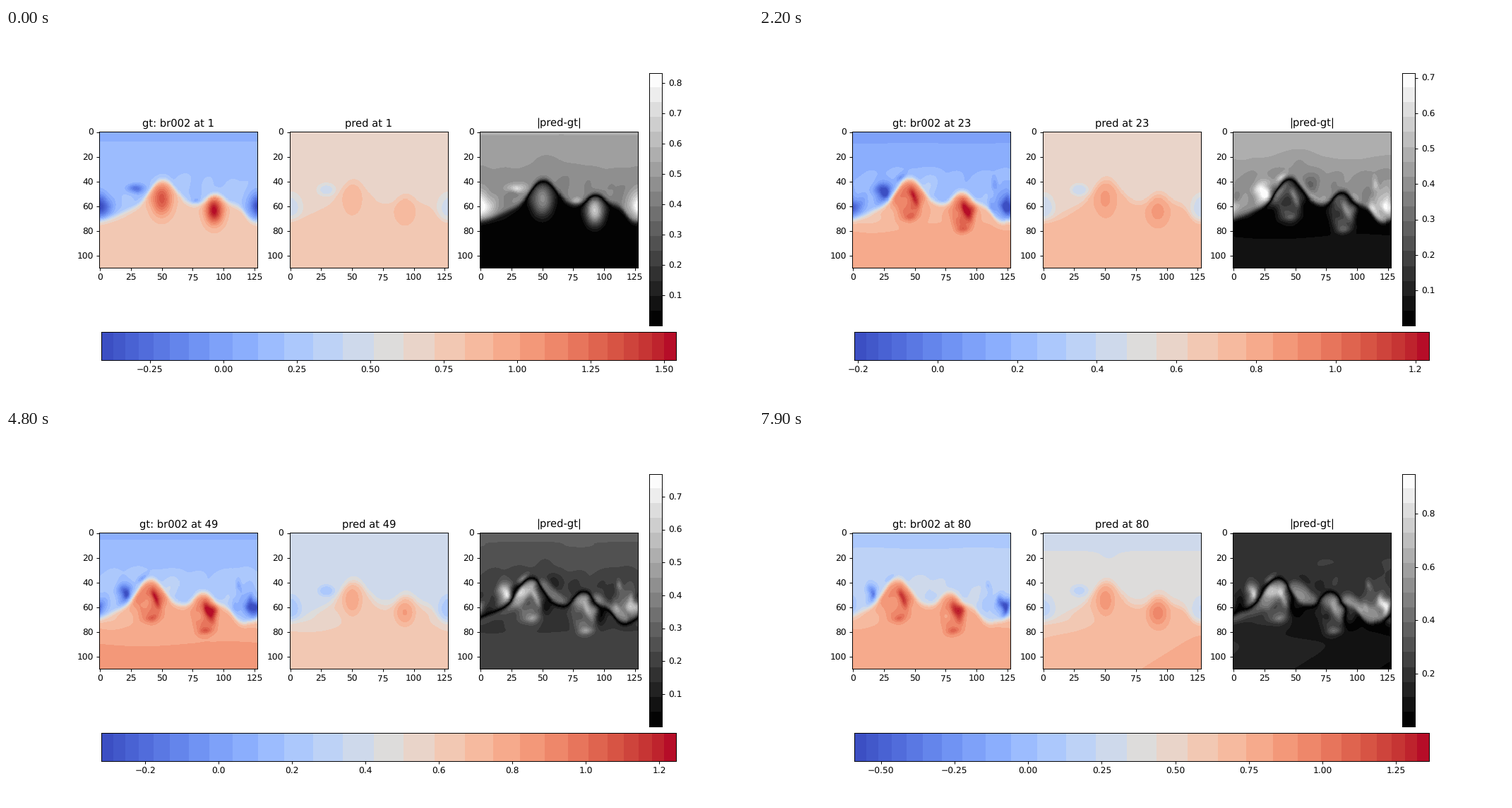
Animation of 1058 by 529 pixels, one loop 8 s. Source, as a matplotlib script:

```python
import numpy as np
import matplotlib.pyplot as plt
from matplotlib.animation import FuncAnimation
from matplotlib.colors import ListedColormap

W, H, FRAMES = 1058, 529, 80
plt.rcParams["font.family"] = "DejaVu Sans"
plt.rcParams["text.hinting"] = "none"

NX, NY = 224, 193
X, Y = np.meshgrid((np.arange(NX) + .5) / NX * 128 - .5,
                   (np.arange(NY) + .5) / NY * 110 - .5)

rng = np.random.default_rng(4)
WAVES = [[(rng.integers(2, 9), rng.uniform(-.4, .4), rng.uniform(0, 6.28))
          for _ in range(6)] for _ in range(3)]
STREAKS = [(rng.uniform(98, 128), rng.uniform(36, 64), rng.uniform(-.6, .6),
            rng.uniform(-.2, .03)) for _ in range(8)]


def sig(v):
    return 1 / (1 + np.exp(-np.clip(v, -40, 40)))


def wrap(d):
    return (d + 64) % 128 - 64


def blob(x, y, cx, cy, sx, sy, rot=0, power=1):
    d, e = wrap(x - cx), y - cy
    c, s = np.cos(rot), np.sin(rot)
    u, v = (d * c + e * s) / sx, (e * c - d * s) / sy
    return np.exp(-(u * u + v * v) ** power)


def ripple(n, x, y):
    return sum(np.sin(x * m * np.pi / 64 + y * q + ph)
               for m, q, ph in WAVES[n]) / 2.5


def clock(k):
    """Loop share, early decay and leftward drift at step k."""
    p = k / (FRAMES - 1)
    return p, np.exp(-k / 11), 15 * p ** .85


def limits(k):
    p, e, _ = clock(k)
    lo = -.16 - .43 * p * p - .255 * e ** 1.4
    hi = 1.17 + .193 * p * p + .371 * e
    top = np.interp(k, [0, 9, 14, 22, 42, 55, 67, 79],
                    [.834, .702, .685, .714, .731, .815, .853, .95])
    return lo, hi, top


def height(x, grow):
    """Warm/cold interface: a plateau with two humps."""
    x = x % 128
    plateau = 15 * (sig((x - 17) / 8) + sig((x - 145) / 8)) * sig((117 - x) / 2.8)
    plateau += 1.6 * sig((x - 128) / 2)
    hump1 = (19.5 + 1.5 * grow) * np.exp(-np.abs(wrap(x - 51) / 13.7) ** 2.3)
    hump2 = (7.5 + 2.5 * grow) * np.exp(-np.abs(wrap(x - 93) / 9.3) ** 2.3)
    return 73.5 - plateau - hump1 - hump2


def lobe(x, y, cx, cy, size, amp, grow, core):
    """Hot body that flattens while a tilted core and a tail form in it."""
    body = blob(x, y, cx, cy, size * (9 + 3.5 * grow), size * (13.5 + 3 * grow),
                0, 1.1 + .9 * grow)
    inner = (blob(x, y, cx + 4.5, cy - 3, 3.2, 8.5, -.35)
             + .6 * blob(x, y, cx + 1, cy + 13, 6, 3, -.15)
             - .4 * blob(x, y, cx - 5, cy + 1, 4, 5))
    return amp * body + core * grow * inner


def truth(k):
    p, e, s = clock(k)
    g = 1 - e
    env = np.exp(-((Y - 54) / 17) ** 2)
    a = (.35 + 1.15 * g) * env
    x = X + a * ripple(0, X + s, Y)
    y = Y + .8 * a * ripple(1, X + s, Y)
    warm = sig((Y - height(X + s, g)) / 1.35)

    cold = .07 + .06 * sig((Y - 5) / 3)
    cold = cold + .085 * sig((Y - 29 - 2 * np.sin(X / 14 + s / 4)) / 5)
    cold += (.03 + .025 * g) * env * ripple(2, X + s, Y)
    depth = limits(k)[0] - .22
    edge = 1 - .5 * s
    cold += depth * ((1 - .65 * p) * blob(x, y, edge, 60, 8.5, 10)
                     + .65 * p * blob(x, y, edge, 60, 3, 9))
    cold -= (.45 + .1 * p) * blob(x, y, 29 - .95 * s, 46 + 3 * g,
                                  7 - 3 * p, 4 + 4 * g)
    cold -= .2 * e * blob(x, y, 77 - s, 56, 4, 2.5)
    cold += g * (.08 * blob(x, y, 62 - .2 * s, 43, 12, 9)
                 - .2 * blob(x, y, 43 - .9 * s, 37, 5, 2.2, -.7))
    for cx, cy, tilt, amp in STREAKS:
        cold += g * amp * blob(x, y, cx - .5 * s, cy, 2.5, 5, tilt)

    hot = .775 + .055 * g * sig((Y - 84 - 2 * np.sin(X / 22)) / 3)
    hot = hot + lobe(x, y, 50 - .9 * s, 54 + 2 * g, 1, .2 + .36 * e, g, .2 + .1 * p)
    hot += lobe(x, y, 92 - .8 * s, 63 + 3 * g, .87, .2 + .56 * e, g, .24 + .12 * p)
    hot -= (.03 + .08 * g) * blob(x, y, 18 - s, 69, 17, 8)
    return cold + (hot - cold) * warm


def forecast(k):
    late = sig((k - 74) / 2.5)
    warm = sig((Y - height(X, .2)) / 1.6)
    cold = .275 + .36 * sig((38 - k) / 10)
    cold = cold + .03 * sig((Y - 8) / 2) + .09 * late * sig((Y - 18) / 4)
    cold += .04 * late * sig((X - 60) / 6) * sig((Y - 36) / 4)
    cold -= .03 * blob(X, Y, 53, 22, 11, 7)
    cold -= .2 * (blob(X, Y, 0, 61, 9, 11, 0, 1.5)
                  + blob(X, Y, 29, 47, 7, 5, 0, 1.5))
    amp = .09 + .12 * sig((k - 34) / 5) + .03 * late
    hot = .59 + .2 * sig((32 - k) / 6) + .1 * late
    hot = hot + .06 * late * ((Y - 70) / 40 + (X - 64) / 64)
    hot += amp * (blob(X, Y, 50, 54, 8, 13, 0, 1.3)
                  + 1.1 * blob(X, Y, 92, 64, 8.5, 11, 0, 1.3))
    hot -= .1 * min(k / 55, 1) * blob(X, Y, 14, 69, 22, 8)
    return cold + (hot - cold) * warm


def banded(name, n, squeeze):
    """Colour map in n flat bands, narrower at both ends."""
    u = np.linspace(0, 1, n + 1)
    edges = u - squeeze * np.sin(2 * np.pi * u) / (2 * np.pi)
    mids = (edges[1:] + edges[:-1]) / 2
    band = np.searchsorted(edges, (np.arange(815) + .5) / 815) - 1
    return ListedColormap(plt.get_cmap(name)(mids[band]))


HEAT = banded("coolwarm", 27, .45)
GREY = ListedColormap([(v, v, v) for v in np.linspace(.012, .992, 17)])

fig = plt.figure(figsize=(12, 6), dpi=88.1667, facecolor="white")


def add_axes(x0, y0, x1, y1):
    return fig.add_axes([x0 / W, 1 - y1 / H, (x1 - x0) / W, (y1 - y0) / H])


def panel(i, cmap):
    x0 = 132.3 + 269.4 * i
    ax = add_axes(x0, 146.8, x0 + 224.1, 339.8)
    im = ax.imshow(np.zeros((NY, NX)), cmap=cmap, interpolation="nearest",
                   aspect="auto", extent=(-.5, 127.5, 109.5, -.5))
    ax.set_xticks(range(0, 126, 25))
    ax.set_yticks(range(0, 101, 20))
    return ax, im


ax_gt, im_gt = panel(0, HEAT)
ax_pred, im_pred = panel(1, HEAT)
ax_diff, im_diff = panel(2, GREY)
ax_diff.set_title("|pred-gt|")

ramp = np.linspace(0, 1, 816)[None, :]
heat_ax = add_axes(135.2, 430.8, 949.4, 470.8)
heat_bar = heat_ax.imshow(ramp, cmap=HEAT, aspect="auto", interpolation="nearest")
heat_ax.set_yticks([])
grey_ax = add_axes(911.4, 63.6, 929.4, 422.3)
grey_bar = grey_ax.imshow(ramp.T, cmap=GREY, aspect="auto", origin="lower",
                          interpolation="nearest")
grey_ax.set_xticks([])
grey_ax.yaxis.tick_right()


def draw(k):
    gt, pred = truth(k), forecast(k)
    lo, hi, top = limits(k)
    for im, data in ((im_gt, gt), (im_pred, pred)):
        im.set_data(data)
        im.set_clim(lo, hi)
    im_diff.set_data(np.abs(pred - gt))
    im_diff.set_clim(0, top)
    ax_gt.set_title(f"gt: br002 at {k + 1}")
    ax_pred.set_title(f"pred at {k + 1}")
    heat_bar.set_extent((lo, hi, 0, 1))
    heat_ax.set_xlim(lo, hi)
    grey_bar.set_extent((0, 1, .0004, top))
    grey_ax.set_ylim(.0004, top)
    return []


anim = FuncAnimation(fig, draw, frames=FRAMES, interval=100, repeat=True,
                     repeat_delay=0, init_func=lambda: draw(0))
plt.show()
```
